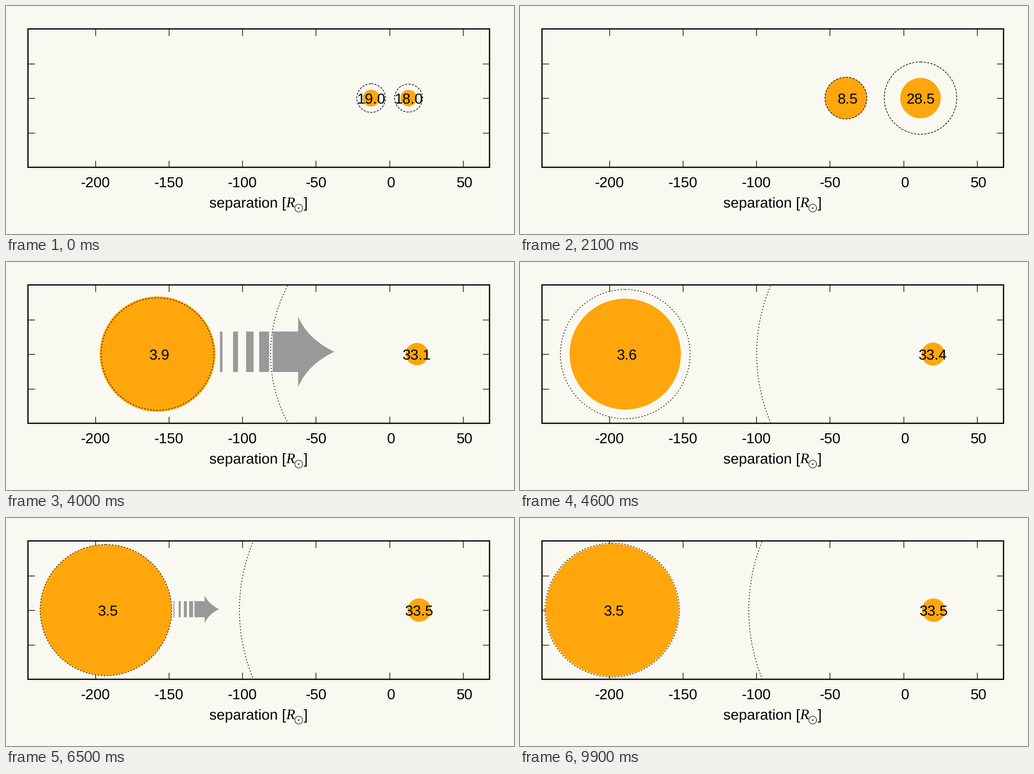
A matplotlib script for the animation above (10000 ms loop, 1017 by 458 pixels).

```python
import numpy as np
import matplotlib.pyplot as plt
from matplotlib.animation import FuncAnimation
from matplotlib.patches import Circle, PathPatch, Rectangle
from matplotlib.path import Path
from matplotlib.transforms import Affine2D

plt.rcParams["text.hinting"] = "none"

W, H, DPI = 1017, 458, 100
FRAMES, STEP = 100, 100
PT = 72 / DPI
PAPER, STAR, ARROW = "#faf9f1", "#fea60b", "#9a9899"
LEFT, RIGHT, TOP, BOTTOM = 43.5, 967.5, 46, 323.7
X0, UNIT, MID = 767.5, 2.941, 185
TOTAL_MASS, ORBIT = 37.0, 2.98e6
EM = 29.4


def ease(t, start, end):
    """Smooth rise from 0 to 1 between two times."""
    x = np.clip((t - start) / (end - start), 0, 1)
    return x * x * (3 - 2 * x)


def bump(t, peak, width, height):
    return height * np.exp(-((t - peak) / width) ** 2)


def donor_mass(t):
    return (19 - 10.5 * ease(t, 1100, 1950) - 4.933 * ease(t, 2898, 4219)
            - .085 * ease(t, 5700, 7500))


def donor_fill(t):
    """Donor radius as a share of its Roche lobe."""
    swell = .59 + .41 * ease(t, 0, 1200) + .027 * ease(t, 2900, 3500)
    collapse = .99 * (ease(t, 4350, 5300) - ease(t, 5600, 6600))
    return swell - collapse - .037 * ease(t, 7000, 9900)


def gainer_radius(t):
    return (16.5 + 24 * ease(t, 900, 1900) - 18 * ease(t, 2766, 4000)
            + ease(t, 4000, 5000))


def flow(t):
    """Height of the mass-transfer arrow."""
    return (bump(t, 1450, 190, 325) + bump(t, 3100, 150, 200)
            + bump(t, 3772, 227, 388) + bump(t, 6600, 400, 60)
            + bump(t, 8570, 770, 16))


def roche(q):
    """Roche lobe radius as a share of the separation."""
    c = np.cbrt(q)
    return .49 * c**2 / (.6 * c**2 + np.log(1 + c))


def arrow_path():
    """Striped arrow of unit height, starting at the origin."""
    half = .287
    bars = []
    for k in range(4):
        a, width = .185 * k, .035 + .035 * k
        bars.append(Path([(a, -half), (a + width, -half), (a + width, half),
                          (a, half), (a, -half)], closed=True))
    neck, tip = 1.106, (1.617, 0)
    head = Path([(.745, -half), (neck, -half), (neck, -.5), (1.24, -.18), tip,
                 (1.24, .18), (neck, .5), (neck, half), (.745, half),
                 (.745, -half)],
                [Path.MOVETO] + [Path.LINETO] * 2 + [Path.CURVE3] * 4
                + [Path.LINETO] * 2 + [Path.CLOSEPOLY])
    return Path.make_compound_path(*bars, head)


fig = plt.figure(figsize=(W / DPI, H / DPI), dpi=DPI, facecolor=PAPER)
ax = fig.add_axes([0, 0, 1, 1])
ax.set(xlim=(0, W), ylim=(H, 0))
ax.axis("off")


def write(x, y, s="", ha="center", **kw):
    kw = {"family": "Liberation Sans", "zorder": 9, **kw}
    return ax.text(x, y, s, ha=ha, va="baseline", fontsize=EM * PT, **kw)


def line(xs, ys):
    ax.plot(xs, ys, color="black", lw=1.3 * PT, zorder=1)


frame = dict(xy=(LEFT, TOP), width=RIGHT - LEFT, height=BOTTOM - TOP)
ax.add_patch(Rectangle(**frame, fill=False, ec="black", lw=2.5 * PT, zorder=2))
window = Rectangle(**frame, transform=ax.transData)

for v in range(-200, 51, 50):
    x = X0 + v * UNIT
    line([x, x], [TOP, TOP + 13])
    line([x, x], [BOTTOM, BOTTOM - 13])
    write(x + (4 if v >= 0 else 0), 364, str(v))
for y in MID + np.array([-69.5, 0, 69.5]):
    line([LEFT, LEFT + 13], [y, y])
    line([RIGHT, RIGHT - 13], [y, y])

write(407, 404.5, "separation [", ha="left")
write(560, 404.5, "R", ha="left", family="Liberation Serif", style="italic")
write(596, 404.5, "]", ha="left")
ax.add_patch(Circle((586, 406), 7.8, fill=False, ec="black", lw=PT))
ax.add_patch(Circle((586, 406), 1.4, fc="black", lw=0))


class Star:
    def __init__(self):
        self.disc = Circle((0, MID), 1, fc=STAR, lw=0, zorder=3)
        self.lobe = Circle((0, MID), 1, fill=False, ec="black", lw=1.3 * PT,
                           zorder=5)
        for patch in (self.disc, self.lobe):
            ax.add_patch(patch)
            patch.set_clip_path(window)
        self.label = write(0, 195.5)

    def place(self, x, radius, lobe, mass):
        self.disc.set(center=(x, MID), radius=radius)
        dash = (3.2, 2) if lobe < 80 else (1.9, 2.8)
        self.lobe.set(center=(x, MID), radius=lobe, linestyle=(0, dash))
        text = f"{mass:.1f}"
        self.label.set_text(text)
        self.label.set_x(x + (4 if len(text) < 4 else 0))


donor, gainer = Star(), Star()
arrow = PathPatch(arrow_path(), fc=ARROW, lw=0, zorder=4)
ax.add_patch(arrow)


def update(i):
    t = i * STEP
    m1 = donor_mass(t)
    m2 = TOTAL_MASS - m1
    # conservative transfer: separation goes as (m1 m2)^-2
    sep = ORBIT / (m1 * m2) ** 2 * UNIT
    x1, x2 = X0 - sep * m2 / TOTAL_MASS, X0 + sep * m1 / TOTAL_MASS
    lobe1, lobe2 = sep * roche(m1 / m2), sep * roche(m2 / m1)
    r1 = lobe1 * donor_fill(t)
    donor.place(x1, r1, lobe1, m1)
    gainer.place(x2, gainer_radius(t), lobe2, m2)

    size = flow(t)
    arrow.set_visible(size > 1)
    arrow.set_transform(Affine2D().scale(max(size, 1))
                        .translate(x1 + r1 + .064 * size, MID - .033 * size)
                        + ax.transData)
    return []


anim = FuncAnimation(fig, update, frames=FRAMES, interval=STEP, repeat=True,
                     repeat_delay=0, blit=False)
plt.show()
```
